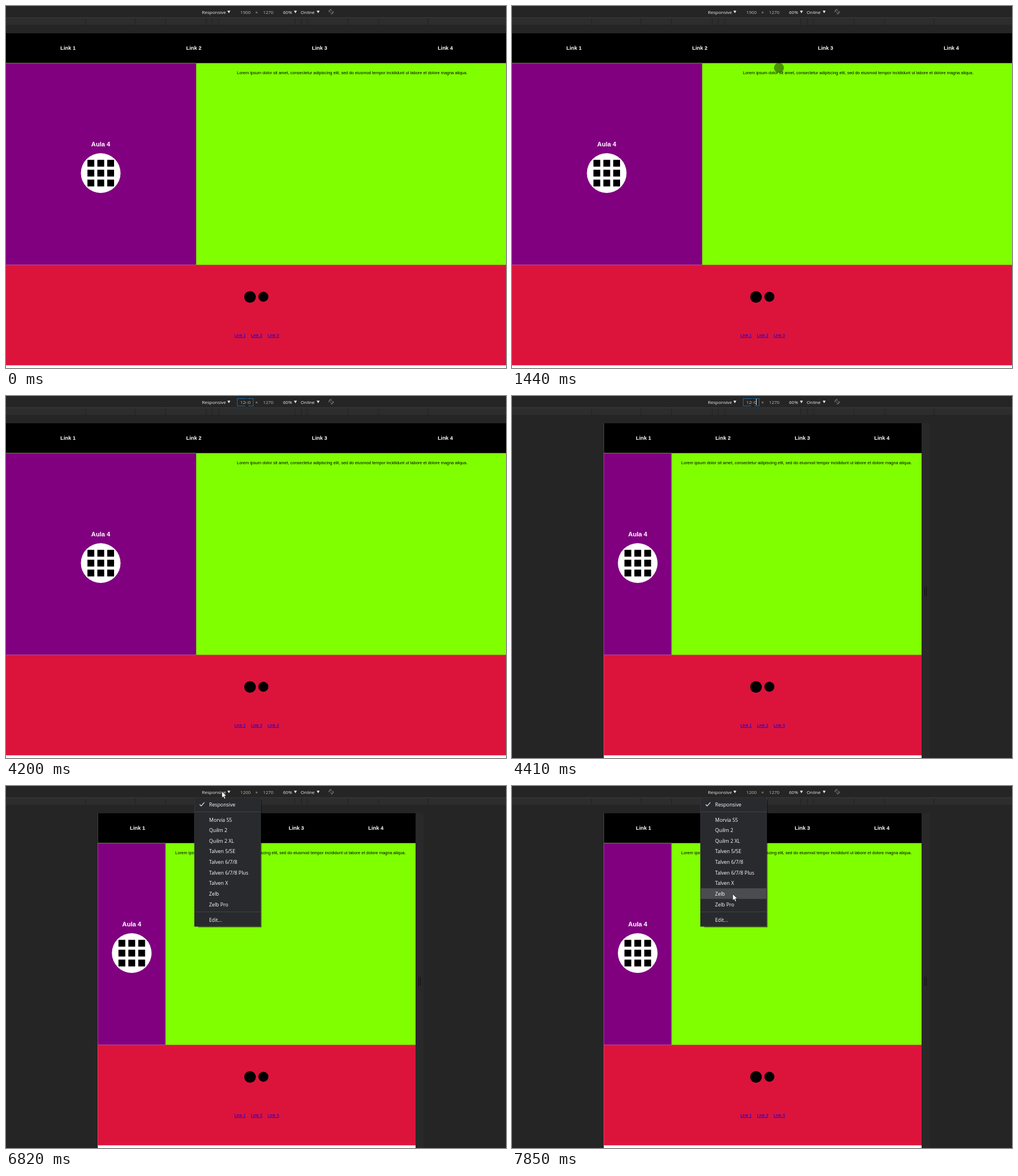
An HTML page for the animation above (8000 ms loop, 879x637 px).

```html
<!DOCTYPE html>
<html lang="en">
<head>
<meta charset="utf-8">
<title>Responsive page preview</title>
<style>
html, body { margin: 0; width: 100%; height: 100%; overflow: hidden; background: #252525; }
svg { display: block; width: 879px; height: 637px; }
.ui { font: 8px "Open Sans", sans-serif; fill: #eee; }
.dim { fill: #c6b8aa; }
.menu { font: 8.75px "Open Sans", sans-serif; fill: #fff; }
.page { font: 7.45px "Liberation Sans", Arial, sans-serif; }
.nav { font-size: 9.31px; font-weight: bold; fill: #fff; }
.title { font-size: 11.17px; font-weight: bold; fill: #fff; }
.link { fill: #00e; text-decoration: underline; }
.mid { text-anchor: middle; }
</style>
</head>
<body>
<svg viewBox="0 0 879 637">
  <rect width="879" height="637" fill="#252525"/>
  <g id="wide" class="page"></g>
  <g id="narrow" class="page"></g>

  <g class="ui">
    <rect y="20" width="879" height="1" fill="#3a3a3a"/>
    <rect y="21" width="879" height="12" fill="#2d2d2d"/>
    <path id="ticks" stroke="#222"/>
    <text x="344.5" y="13.6">Responsive</text>
    <text x="487" y="13.6">60%</text>
    <text x="518" y="13.6">Online</text>
    <text id="size" class="dim mid" x="421" y="13.6"></text>
    <text class="dim mid" x="440.5" y="14">×</text>
    <text class="dim mid" x="461" y="13.6">1270</text>
    <path d="M389.2 8.3h5.2l-2.6 4.4zM506.2 8.3h5.2l-2.6 4.4zM546.2 8.3h5.2l-2.6 4.4z"/>
    <g fill="none" stroke="#999" stroke-width=".7" transform="translate(571.7 10)">
      <rect x="-1.6" y="-3" width="3.2" height="6" rx=".6" transform="rotate(-45)"/>
      <path d="M-4.1 .8A4.2 4.2 0 0 1 .8 -4.1M4.1 -.8A4.2 4.2 0 0 1 -.8 4.1"/>
    </g>
    <rect id="field" x="406.5" y="4.5" width="28" height="13" fill="none"/>
    <rect id="caret" y="5" width="1" height="11" fill="#ddd"/>
  </g>

  <g id="menu" class="menu">
    <rect x="338" y="24" width="111.3" height="224.7" opacity=".5" fill="#000"/>
    <rect x="331.5" y="20.5" width="116" height="226.5" fill="#292a2d" stroke="#343538"/>
    <rect id="hover" x="332" width="115" height="18.6" fill="#4b4c4f"/>
    <path d="M332 45.5H447M332 221.5H447" stroke="#424346"/>
    <path d="M340.5 32.5l2.6 2.7 5.6-6.4" fill="none" stroke="#eee" stroke-width="1.2"/>
  </g>

  <circle id="glow" r="9.8" fill="#fff000" opacity=".62"/>
  <circle id="touch" r="8.5" fill-opacity=".43" stroke="#000" stroke-opacity=".18"/>
  <g id="beam" fill="none">
    <path id="ibeam" d="M-2.5 -6H-.6L0 -5.4 .6 -6H2.5M0 -5.4V5.4M-2.5 6H-.6L0 5.4 .6 6H2.5" stroke="#222" stroke-width="2"/>
    <use href="#ibeam" style="stroke: #ddd; stroke-width: .9"/>
  </g>
  <path id="arrow" d="M0 0V11.5L2.6 9.1 4.4 13.3 6.4 12.4 4.6 8.3H8.3Z" fill="#fff" stroke="#111" stroke-width=".7"/>
</svg>

<script>
const LOOP = 8000, MIDDLE = 440.7, SCALE = 0.4655;
const $ = id => document.getElementById(id);
const show = (id, on) => $(id).setAttribute('visibility', on ? 'visible' : 'hidden');
const place = (id, [x, y]) => $(id).setAttribute('transform', `translate(${x} ${y})`);
const range = (n, f) => Array.from({ length: n }, (_, i) => f(i)).join('');
const rect = (x, y, w, h, fill) =>
  `<rect x="${x}" y="${y}" width="${w}" height="${h}" fill="${fill}"/>`;
const text = (x, y, s, cls = '') => `<text x="${x}" y="${y}" class="${cls}">${s}</text>`;

const lorem = 'Lorem ipsum dolor sit amet, consectetur adipiscing elit, ' +
  'sed do eiusmod tempor incididunt ut labore et dolore magna aliqua.';

// The web page at a viewport width; split separates its two columns.
function page(viewport, split) {
  const w = viewport * SCALE, x = MIDDLE - w / 2, side = (x + split) / 2;
  const purple = split - x;
  return rect(x, 48, w, 589, '#fff') +
    rect(x, 48, w, 53, '#000') +
    rect(x, 100.5, w, 356, '#80ff00') +
    rect(x, 100.5, purple, 356, '#800080') +
    rect(x, 455.5, w, 176.8, '#dc143c') +
    rect(x, 100, purple, 1, '#ffffff40') + rect(x, 455, purple, 1, '#ffffff40') +
    range(4, i => text(x + w * (i + 0.5) / 4, 77.3, `Link ${i + 1}`, 'nav mid')) +
    text((split + x + w) / 2, 119.6, lorem, 'mid') +
    text(side + 0.2, 247.3, 'Aula 4', 'title mid') +
    `<circle cx="${side + 0.1}" cy="294" r="34.9" fill="#fff"/>` +
    range(9, i => rect(side - 23.2 + i % 3 * 17.4, 270.7 + Math.floor(i / 3) * 17.4, 12, 12, '#000')) +
    '<circle cx="429" cy="512" r="10.2"/><circle cx="452.5" cy="511.6" r="8.8"/>' +
    range(3, i => text(401.5 + i * 29.3, 582, `Link ${i + 1}`, 'link'));
}

$('wide').innerHTML = page(1900, 334.3);
$('narrow').innerHTML = page(1200, 280.4) + rect(720, 48, 14, 589, '#292929') +
  '<path d="M725.5 335.5v16M728.5 335.5v16" stroke="#101010"/>';

// Ruler marks for common screen widths, mirrored around the middle.
$('ticks').setAttribute('d', [320, 375, 425, 768, 1024, 1440]
  .map(w => `M${441 - w * 0.209} 22v11M${441 + w * 0.209} 22v11`).join(''));

const devices = ['Morvia S5', 'Quilm 2', 'Quilm 2 XL', 'Talven 5/SE', 'Talven 6/7/8',
  'Talven 6/7/8 Plus', 'Talven X', 'Zelb', 'Zelb Pro'];
const ROW = 18.62, LIST_TOP = 50;
$('menu').insertAdjacentHTML('beforeend', text(357, 35.6, 'Responsive') +
  devices.map((d, i) => text(357, LIST_TOP + i * ROW + 12.6, d)).join('') +
  text(357, 238.6, 'Edit...'));

// Pointer moves: each curves from where the last one ended, bent towards via.
const moves = [
  { start: 70, end: 820, via: [572, 421], to: [516, 207] },
  { start: 900, end: 1680, via: [507, 154], to: [411, 25] },
  { start: 1770, end: 2000, via: [438, 0], to: [464, 31] },
  { start: 2170, end: 2470, to: [418.5, 10] },
  { start: 2700, end: 2870, to: [420, 12] },
  { start: 3480, end: 3560, to: [423.2, 11.7] },
  { start: 5190, end: 5500, via: [530, 30], to: [464, 35] },
  { start: 5950, end: 6500, via: [425, 30], to: [379.5, 9.5] },
  { start: 7140, end: 7850, via: [383, 60], to: [388, 190] }
];
const STEP = 77;

function pointer(t) {
  let at = [830, 690];
  for (const { start, end, via, to } of moves) {
    if (t < start) break;
    const gaps = Math.round((end - start) / STEP);
    const done = Math.min(gaps, Math.floor((t - start) / (end - start) * gaps + 0.05)) + 1;
    const u = done / (gaps + 1), v = 1 - u;
    at = at.map((from, k) => {
      const bend = via ? via[k] : (from + to[k]) / 2;
      return v * v * from + 2 * u * v * bend + u * u * to[k];
    });
  }
  return at;
}

const within = (t, a, b) => t >= a && t < b;

function render(t) {
  const [x, y] = pointer(t);
  const open = t >= 6820, resized = t >= 4410;
  const focused = within(t, 2560, 6670);
  const inField = within(x, 406, 435) && within(y, 4, 18);

  // The pointer's shape follows from what lies under it.
  const shape = inField ? 'beam' : y > 48 && !open ? 'touch' : 'arrow';
  for (const id of ['touch', 'beam', 'arrow']) show(id, id === shape);
  place(shape, [x, y]);
  show('glow', within(t, 2400, 2560) || within(t, 3020, 3330) || within(t, 6670, 6820));
  place('glow', [x, y]);

  show('wide', !resized);
  show('narrow', resized);
  $('size').textContent = t < 4020 ? '1900' : t < 4200 ? '100' : '1200';
  show('field', focused || inField);
  $('field').setAttribute('stroke', focused ? '#1b6aa5' : '#5a5a5a');
  show('caret', focused && Math.floor((t - 10) / 550) % 2 === 0);
  $('caret').setAttribute('x', resized ? 429 : 420);

  const row = Math.floor((y - LIST_TOP) / ROW);
  const onFirst = within(y, 23, 43);
  show('menu', open);
  show('hover', open && (onFirst || row >= 0));
  $('hover').setAttribute('y', onFirst ? 23 : LIST_TOP - 0.3 + row * ROW);
}

function tick() {
  render(performance.now() % LOOP);
  requestAnimationFrame(tick);
}
tick();
</script>
</body>
</html>
```
